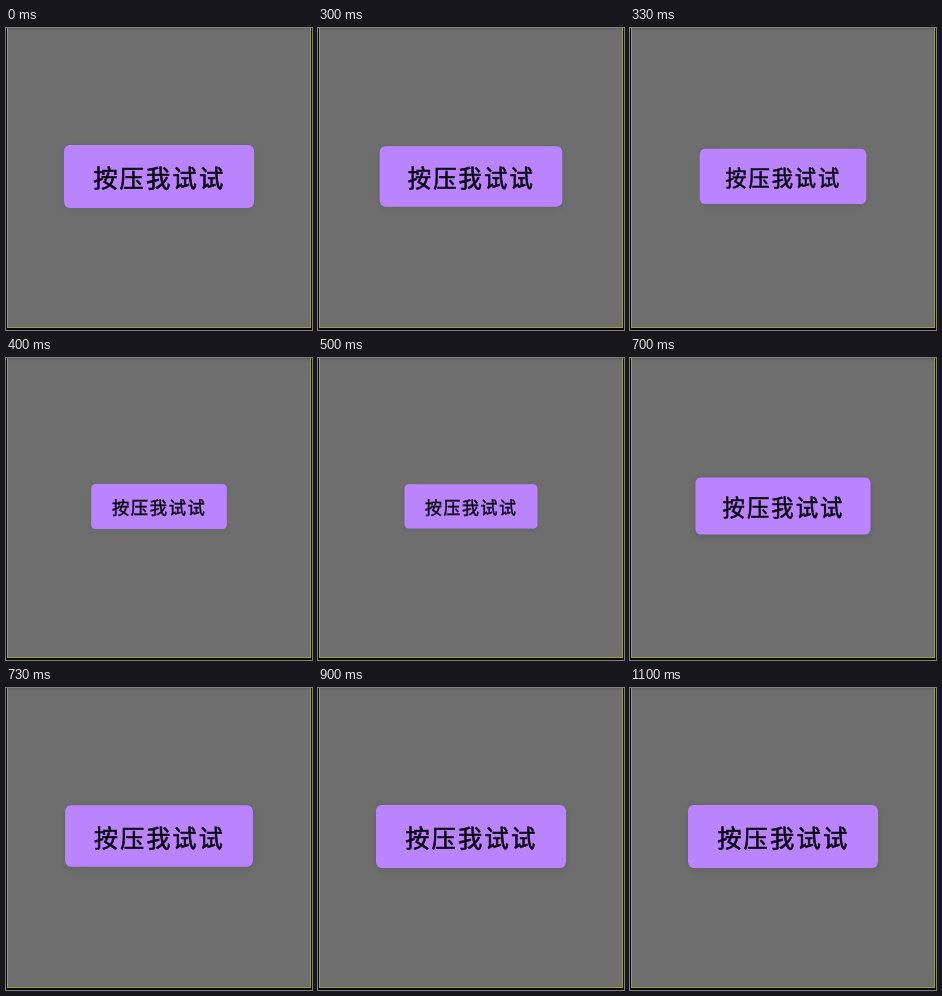
Recreate the animation shown at these times as an HTML page. Size 306x302 px, loop 1400 ms.

```html
<!DOCTYPE html>
<html lang="zh">
<head>
<meta charset="utf-8">
<style>
html, body { margin: 0; width: 100%; height: 100%; overflow: hidden; background: #000; }
#stage { position: relative; width: 306px; height: 302px; background: #080806; overflow: hidden; }
#panel {
  position: absolute; left: 1px; top: -2px; width: 302px; height: 300px;
  border: 1px solid #9c9c44;
  background: linear-gradient(#626262 1px, #6e6e6e 4px);
}
#button {
  position: absolute; left: 57.8px; top: 117.3px; width: 190px; height: 62.4px;
  border-radius: 6px; background: #bb84ff; color: #0c0812;
  font: 500 24.3px/63.5px "Noto Sans CJK SC", "Noto Sans CJK", sans-serif;
  -webkit-text-stroke: 0.6px;
  letter-spacing: 2.17px; text-indent: 1px; text-align: center; white-space: nowrap;
}
</style>
</head>
<body>
<div id="stage">
  <div id="panel"></div>
  <div id="button">按压我试试</div>
</div>
<script>
const LOOP = 1400, FRAME = 100 / 3;
const PRESS = 265, RELEASE = 597, LENGTH = 155;
const button = document.getElementById("button");

function ease(time, start) {
  const p = Math.min(1, Math.max(0, (time - start) / LENGTH));
  return p * p * (3 - 2 * p);
}

function draw(now) {
  // The motion steps at 30 frames per second and rests until 300 ms.
  const step = Math.floor((now % LOOP) / FRAME + 0.11);
  const time = step < 9 ? 0 : step * FRAME;
  const released = ease(time, RELEASE);
  const depth = ease(time, PRESS) - released;
  const lift = Math.min(1, released * 5) * (1 - released * 0.8);
  button.style.transform = `scale(${1 - 0.3 * depth})`;
  button.style.boxShadow = `0 2px 7px rgba(0, 0, 0, ${0.06 + 0.2 * lift})`;
  requestAnimationFrame(() => draw(performance.now()));
}
draw(0);
</script>
</body>
</html>
```
